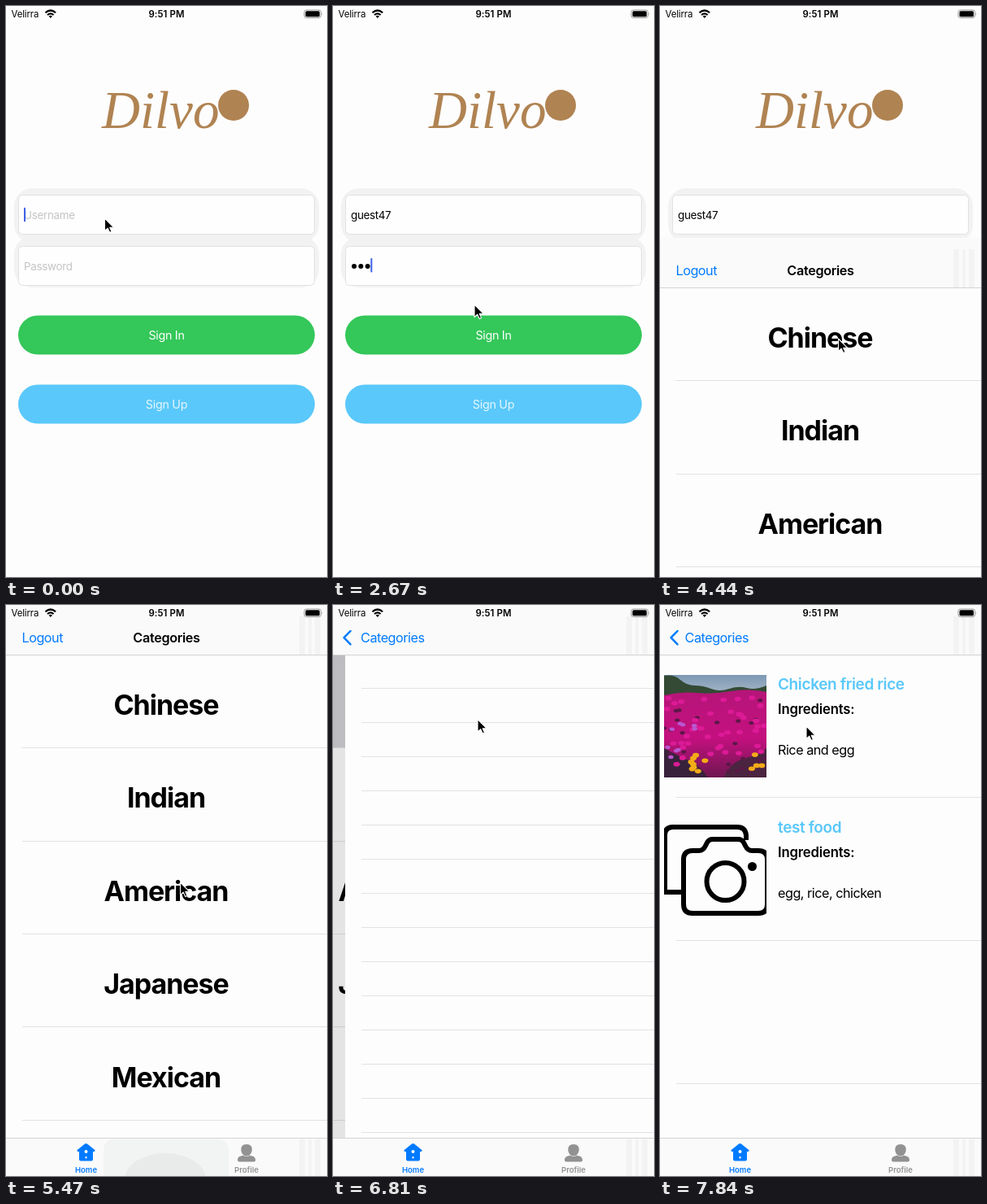
Write an HTML page that moves like this. It is 395 px wide and 702 px high and loops after 7990 ms.

```html
<!DOCTYPE html>
<html lang="en">
<head>
<meta charset="utf-8">
<title>Recipe app</title>
<style>
  html, body { margin: 0; width: 100%; height: 100%; overflow: hidden; background: #fdfdfd; }
  svg { display: block; width: 100%; height: 100%; }
  text { font: 400 16.2px Inter, "Open Sans", sans-serif; letter-spacing: -.03em; white-space: pre; }
  .mid { text-anchor: middle; }
  .blue { fill: #007aff; }
  .field { font-size: 13.4px; letter-spacing: -.022em; }
  .hint { fill: #c4c4c6; }
  .button { font-size: 14.3px; letter-spacing: -.02em; fill: #fff; }
  .small { font-size: 11.4px; letter-spacing: -.01em; }
  .navTitle { font-weight: 600; letter-spacing: -.02em; }
  .category { font-size: 34px; font-weight: 700; }
  .dish { font-size: 19px; font-weight: 600; letter-spacing: -.02em; fill: #5ac8fa; }
  .label { font-size: 16.7px; font-weight: 600; letter-spacing: -.01em; }
  .tab { font-size: 9.5px; font-weight: 600; letter-spacing: 0; }
  .word { font: italic 400 65px "Liberation Serif", serif; letter-spacing: 0; fill: #b08352; }
  .line { stroke: #e2e2e4; stroke-width: 1; }
  .bar { fill: #fafafa; }
  .edge { stroke: #d3d3d5; stroke-width: 1; }
  .icon { fill: none; stroke: #000; stroke-width: 6; stroke-linejoin: round; }
</style>
</head>
<body>
<svg viewBox="0 0 395 702">
  <defs>
    <clipPath id="photoBox"><rect x="5" y="86" width="126" height="126"/></clipPath>
    <clipPath id="iconBox"><rect x="5" y="268" width="126" height="115"/></clipPath>
    <linearGradient id="sky" x2="0" y2="1">
      <stop stop-color="#7d98b4"/><stop offset="1" stop-color="#c3cdd3"/>
    </linearGradient>
    <linearGradient id="petals" x2="0" y2="1">
      <stop stop-color="#b51578"/><stop offset=".55" stop-color="#c4107f"/><stop offset="1" stop-color="#6e1750"/>
    </linearGradient>
  </defs>

  <rect width="395" height="702" fill="#fdfdfd"/>

  <g id="login">
    <text class="word" x="118" y="150">Dilvo</text>
    <circle cx="280" cy="122" r="19" fill="#b08352"/>
    <g fill="#f2f2f2">
      <rect x="10" y="224" width="375" height="67" rx="22"/>
      <rect x="10" y="283" width="375" height="63" rx="22"/>
    </g>
    <g fill="#fefefe" stroke="#e1e1e1">
      <rect x="15.5" y="232.5" width="364" height="48" rx="5"/>
      <rect x="15.5" y="295.5" width="364" height="48" rx="5"/>
    </g>
    <text id="userHint" class="field hint" x="22" y="261.5">Username</text>
    <text id="user" class="field" x="22" y="261.5"></text>
    <text id="passHint" class="field hint" x="22" y="324.5">Password</text>
    <g id="dots"></g>
    <rect id="caret" width="2" height="17.5" rx=".8" fill="#3f62e8"/>
    <rect x="15" y="380.5" width="365" height="48" rx="24" fill="#34c759"/>
    <rect x="15" y="465.5" width="365" height="48" rx="24" fill="#5ac8fa"/>
    <text id="signIn" class="button mid" x="197.5" y="409.7">Sign In</text>
    <text class="button mid" x="197.5" y="494.7" opacity=".85">Sign Up</text>
  </g>

  <g id="app">
    <rect width="395" height="720" fill="#fdfdfd"/>
    <g id="categories">
      <rect id="picked" y="61" width="395" height="114.5" fill="#d1d1d6"/>
    </g>
    <rect id="dim" y="61" width="395" height="595"/>

    <g id="detail">
      <rect y="61" width="395" height="595" fill="#fdfdfd"/>
      <g id="emptyRows"></g>
      <g id="dishes"></g>
      <g id="images">
        <g id="photo" clip-path="url(#photoBox)">
          <rect x="5" y="86" width="126" height="40" fill="url(#sky)"/>
          <path d="M5 87q12-2 20 5t18 7 20 4 22 0 22-1 24-3v22H5z" fill="#344a35"/>
          <path d="M5 111q20-5 40-3t42-2 44 1v105H5z" fill="url(#petals)"/>
          <path d="M5 176q16 9 30 15t24 21H5z" fill="#38223b"/>
          <path d="M78 212q10-20 28-24t25-12v36z" fill="#4a2440"/>
        </g>
        <g clip-path="url(#iconBox)" class="icon">
          <path d="M27 353H6V283q0-10 10-10H95q10 0 11 10v6"/>
          <path d="M29 368V313q0-11 11-11h8q5 0 8-6l2-4q2-4 7-4H96q5 0 7 4l2 4q3 6 8 6h8q11 0 11 11v55q0 11-11 11H40q-11 0-11-11z"/>
          <circle cx="80.500" cy="340" r="23"/>
          <circle cx="113.500" cy="321.500" r="5.500" fill="#000" stroke="none"/>
        </g>
      </g>
    </g>

    <rect class="bar" width="395" height="61"/>
    <path class="edge" d="M0 61.500H395"/>
    <g fill="#f3f3f3">
      <path d="M361 14h7v47h-7zM372 14h4v47h-4zM380 14h7v47h-7z"/>
    </g>
    <g id="rootNav">
      <text class="blue" x="19.500" y="46">Logout</text>
      <text class="navTitle mid" x="197.500" y="46">Categories</text>
    </g>
    <g id="backNav">
      <path d="M21.500 32L13.500 40.200L21.500 48.400" fill="none" stroke="#007aff" stroke-width="2.500" stroke-linecap="round" stroke-linejoin="round"/>
      <text id="backText" class="blue" y="46">Categories</text>
    </g>

    <rect class="bar" y="656" width="395" height="64"/>
    <g id="behindTabs">
      <rect x="120" y="657" width="154" height="60" rx="12" fill="#f2f3f3"/>
      <ellipse cx="196" cy="706" rx="50" ry="32" fill="#e9ebeb"/>
    </g>
    <path d="M361 657h7v45h-7zM372 657h4v45h-4zM380 657h7v45h-7z" fill="#f3f3f3"/>
    <path class="edge" d="M0 655.500H395"/>
    <g class="blue">
      <path d="M97 662.600q1.500-1.200 3 0l9.300 7.400q1 1.500-.8 2h-1.500v9.500q0 2-2 2H92q-2 0-2-2V672h-1.500q-1.800-.5-.8-2z"/>
      <circle cx="98.500" cy="672" r="2" fill="#fff"/>
      <path d="M97.600 678h1.800v2.500h-1.800z" fill="#fff"/>
      <text class="tab mid" x="98.500" y="698">Home</text>
    </g>
    <g fill="#929292">
      <path d="M296 663c5 0 7 3 6.700 7s-3 7.500-6.700 7.500-6.500-3.500-6.700-7.500 1.700-7 6.700-7z"/>
      <path d="M285 682.500c0-4 3-5 7-5.700q4 2.500 8 0c4 .7 7 1.700 7 5.700q0 2-2 2H287q-2 0-2-2z"/>
      <text class="tab mid" x="296" y="698">Profile</text>
    </g>
  </g>

  <g id="status">
    <text class="small" x="6.500" y="14">Velirra</text>
    <g fill="none" stroke="#000" stroke-width="2.200">
      <path d="M48.500 8.300q6.300-5.600 12.600 0M51 11q3.800-3.300 7.600 0"/>
      <path d="M54.800 15l-2.200-2.400q2.200-1.600 4.400 0z" fill="#000" stroke="none"/>
    </g>
    <text class="small mid" style="font-weight:600;letter-spacing:.01em" x="197.500" y="14">9:51 PM</text>
    <rect x="367" y="5" width="20.500" height="9.500" rx="2.500" fill="none" stroke="#999"/>
    <rect x="368.500" y="6.300" width="17.500" height="7" rx="1.500"/>
    <path d="M388.700 8.200q1.600 1.500 0 3z" fill="#999"/>
  </g>

  <path id="pointer" d="M0 0V15.500L3.700 12.200L6.200 17.600L8.500 16.600L6.200 11.300H11.200Z" stroke="#fff" stroke-width="1.100" stroke-linejoin="round"/>
</svg>

<script>
const LOOP = 7990;
const $ = id => document.getElementById(id);
const add = (id, markup) => $(id).insertAdjacentHTML('beforeend', markup);
const range = n => [...Array(n).keys()];
const rule = (x, y) => `<path class="line" d="M${x} ${Math.floor(y) + .5}H395"/>`;

// Each row: start time in ms, then the values held until the next row.
const POINTER = [
  [0, 121.5, 261], [1340, 135, 300], [1490, 146.5, 336],
  [2520, 153, 344], [2670, 174, 367], [2820, 199, 391], [2970, 215, 405], [3120, 219.5, 409],
  [5030, 219, 396], [5180, 217, 369], [5320, 215, 349], [5470, 214.5, 341],
  [5620, 211, 290], [5770, 194, 165], [5920, 180, 86], [6070, 177.5, 122], [6210, 178, 140.5],
  [7690, 179, 145], [7840, 180, 149]
];
const TYPED = [[0, 0], [450, 1], [590, 3], [740, 4], [1040, 5], [1190, 6], [1340, 7]];
const DOTS = [[0, 0], [2080, 1], [2230, 2], [2380, 3]];
const PRESS = [[0, 1], [3260, .35], [3410, .5], [3550, .65], [3700, .8], [3850, .9], [4000, 1]];
const SHEET = [[0, 702], [4290, 605], [4440, 285], [4590, 82], [4740, 18], [4890, 0]];
const PUSH = [[0, 395], [6660, 150], [6810, 15], [6960, 1], [7110, 0]];
const FOCUS_PASSWORD = 1790, PICK = 6510, ROWS_READY = 7260, IMAGES_READY = 7690;
const USER = 'guest47';

function at(table, t) {
  let row = table[0];
  for (const next of table) if (next[0] <= t) row = next;
  return row.slice(1);
}

function seeded(seed) {
  return () => (seed = seed * 16807 % 2147483647) / 2147483647;
}

function build() {
  add('dots', range(3).map(i => `<circle cx="${26 + i * 8.3}" cy="320" r="3"/>`).join(''));
  add('categories', ['Chinese', 'Indian', 'American', 'Japanese', 'Mexican'].map((name, i) =>
    `<text class="category mid" x="197" y="${135 + i * 114.4}">${name}</text>` +
    rule(i ? 20 : 19, 175.6 + i * 114.4)).join(''));
  add('emptyRows', range(14).map(i => rule(20, 102 + i * 42)).join(''));
  const dishes = [['Chicken fried rice', 'Rice and egg'], ['test food', 'egg, rice, chicken']];
  add('dishes', range(3).map(i => rule(20, 236 + i * 176)).join('') + dishes.map(([name, parts], i) =>
    `<g transform="translate(145 ${i * 176})"><text class="dish" y="103.5">${name}</text>
     <text class="label" y="134">Ingredients:</text><text y="184">${parts}</text></g>`).join(''));

  const rnd = seeded(41);
  const blobs = (n, colour, x, y, w, h, r) => add('photo', range(n).map(() =>
    `<ellipse cx="${x + rnd() * w}" cy="${y + rnd() * h}" rx="${r}" ry="${r * .7}" fill="${colour}"/>`).join(''));
  blobs(24, '#5b1848', 5, 116, 126, 90, 3);
  blobs(40, '#dc1a96', 5, 112, 126, 85, 4);
  blobs(10, '#b957cf', 6, 145, 45, 45, 3.2);
  blobs(8, '#f3ab18', 38, 184, 18, 22, 4);
  blobs(4, '#f3ab18', 110, 176, 18, 26, 4);
}

const show = (id, visible) => $(id).style.display = visible ? '' : 'none';
const move = (id, x, y) => $(id).setAttribute('transform', `translate(${x} ${y})`);

function render(t) {
  const [typed] = at(TYPED, t), [dots] = at(DOTS, t);
  const [sheet] = at(SHEET, t), [push] = at(PUSH, t);
  const pushed = 1 - push / 395;

  $('user').textContent = USER.slice(0, typed);
  show('userHint', !typed);
  show('passHint', !dots);
  [...$('dots').children].forEach((dot, i) => dot.style.display = i < dots ? '' : 'none');
  const onPassword = t >= FOCUS_PASSWORD;
  const textWidth = onPassword ? dots * 8.1 : typed && $('user').getComputedTextLength();
  move('caret', 22 + textWidth, onPassword ? 310 : 247.8);
  $('signIn').style.opacity = at(PRESS, t)[0];

  show('app', sheet < 702);
  move('app', 0, sheet);
  show('picked', t >= PICK);
  move('categories', -118.5 * pushed, 0);
  $('dim').style.opacity = .1 * pushed;
  show('detail', pushed > 0);
  move('detail', push, 0);
  $('rootNav').style.opacity = Math.max(0, 1 - pushed * 1.3);
  $('backNav').style.opacity = Math.min(1, pushed * 1.05);
  $('backText').setAttribute('x', 30.6 + push * .23);
  show('behindTabs', pushed === 0);
  show('emptyRows', t < ROWS_READY);
  show('dishes', t >= ROWS_READY);
  show('images', t >= IMAGES_READY);

  move('pointer', ...at(POINTER, t));
}

build();
const start = performance.now();
function tick() {
  render((performance.now() - start) % LOOP);
  requestAnimationFrame(tick);
}
tick();
</script>
</body>
</html>
```
